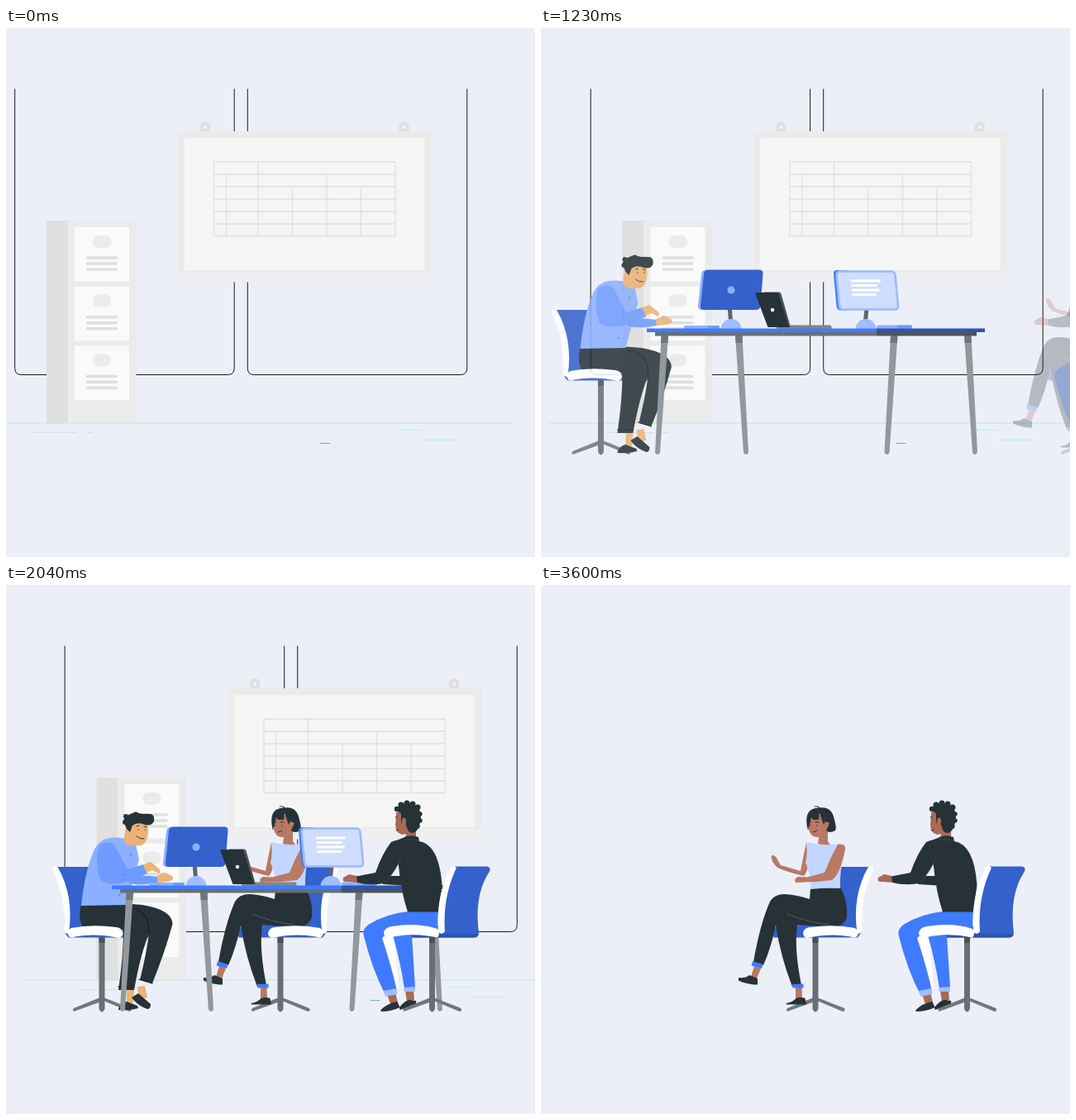
Write an HTML page that moves like this. It is 640x640 px and loops after 3630 ms.

```html
<!DOCTYPE html>
<html lang="en">
<head>
<meta charset="utf-8">
<title>Office team</title>
<style>
html, body { margin: 0; width: 100%; height: 100%; overflow: hidden; background: #edeff8; }
svg { display: block; width: 100vw; height: 100vh; }
.ink { fill: #263238; } .blue { fill: #407bff; } .chair { fill: #3461cc; }
.sky { fill: #8cb0ff; } .sleeve { fill: #6f9bff; } .white { fill: #fff; }
.tan { fill: #ebb376; } .rose { fill: #b97964; } .brown { fill: #a96a55; }
.line { fill: none; stroke-linecap: round; }
</style>
</head>
<body>
<svg viewBox="0 0 640 640">
<defs>
  <g id="stand">
    <path fill="#70787c" d="M-2 499L-34 512q-2 2 0 4L2 503L33 516q4 0 2-4L2 499z"/>
    <path fill="#687075" d="M-3.5 424h7v89q-3.5 7-7 0z"/>
    <path fill="#4a5256" d="M-3.5 425h7v8h-7z"/>
  </g>
  <path id="back" class="chair" d="M345 341H400Q380 380 388 420L383 426.500H282q-4-6 1-12L345 400z"/>
  <g id="seat">
    <path class="white" d="M396 341Q403 339 402 345Q386 376 388.500 418q-1 5-6 3.500Q376 376 396 341z"/>
    <path class="white" d="M317 421q1-6 8-7Q355 410 380 415q6 5 2 10.500-4 2-7 0Q350 421 322 427q-5-1-5-6z"/>
  </g>
  <g id="card">
    <path fill="#fafafa" d="M83 241h66v65.500H83z"/>
    <rect x="105" y="251" width="22" height="15" rx="7" fill="#ebebeb"/>
    <path class="line" stroke="#e0e0e0" stroke-width="3.600" d="M98.500 278H133.500M98.500 285H133.500M98.500 292H133.500"/>
  </g>
  <g id="hook">
    <path fill="#e0e0e0" d="M-6 125v-6a6 6 0 0 1 12 0v6z"/>
    <circle cy="120" r="2" fill="#f5f5f5"/>
  </g>
  <path id="window" class="line" stroke="#000" stroke-width=".9" d="M0 74V411.500q0 8 8 8H257.500q8 0 8-8V74"/>
  <g id="leg">
    <path fill="#92989c" d="M-4 372H4.500L-5.500 513.500q-3 5-6 0z"/>
    <path fill="#70777c" d="M-4 372H4.500L3.900 381H-4.500z"/>
  </g>
</defs>

<g id="room">
  <use href="#window" x="10.700"/><use href="#window" x="292.300"/>
  <path fill="#e0e0e0" d="M49 233h26v245H49z"/>
  <path fill="#ebebeb" d="M75 233h82.500v245H75z"/>
  <use href="#card"/><use href="#card" y="71.700"/><use href="#card" y="143.400"/>
  <use href="#hook" x="241"/><use href="#hook" x="481.500"/>
  <path fill="#efeff1" d="M208 295H515L523 307.500H198z"/>
  <path fill="#ebebeb" d="M208 125h307v170.500H208z"/>
  <path fill="#f5f5f5" d="M216 133h290.500v160H216z"/>
  <path fill="none" stroke="#e0e0e0" stroke-width="1.300" d="M251.500 162H471V251.500H251.500zM251.500 177H471M251.500 192H471M251.500 207H471M251.500 222H471M251.500 237H471M305 162V251.500M266.500 177V251.500M388 177V251.500M346.500 192V251.500M429.500 192V251.500"/>
  <path stroke="#c3f0ec" stroke-width="1.500" d="M-39.500 478H612M477 486.500h25.500M503 498.500h44"/>
  <path stroke="#dcdce8" d="M29 489.500h57M97 489.500h8"/>
  <path stroke="#efefee" d="M132 494h123"/>
  <path stroke="#6fa6d8" d="M380 502.500h12"/>
</g>

<g id="woman">
  <use href="#stand" x="332"/>
  <use href="#back"/>
  <path class="rose" d="M254 474L258 461 266 464 261 476zM308 486h7.500l.5 15h-8z"/>
  <path class="ink" d="M239 475q8 1 13-3l10 4v7.500q-13 0-23-5zM296.500 506q8-1 12-6 6-2 11 0l1.500 7.500H297z"/>
  <path class="rose" d="M321 311L323 330Q324 346 318 352Q300 348 286 342Q277 333 279 327Q284 326 287 334L290 339 314 346Q317 330 321 311zM337 298h10v12l3 4q-8 3-15-1z"/>
  <path class="rose" d="M323 281Q322 299 329 304Q336 307 343 302L351 292 346 277z"/>
  <path class="ink" d="M321.500 290Q319 270 336 269.500q-2-2-6-1 3-3 8 1Q352 268 355 284Q358 295 356 297Q349 301 345 297L349 288 344 286 342 290 337 276 336 284H329L327 281 323 297z"/>
  <path class="line" stroke="#263238" d="M325.500 291h.6M333.500 291h.6M324 287.500l3-.5M332 286.500l4 .5M329 299q3 0 5-2"/>
  <path fill="#c3d6ff" d="M321 311Q340 316 362 313L367 322Q361 348 362 367.500L326 368.500Q327 350 320 336Q323 325 321 311z"/>
  <path class="ink" d="M326 368Q345 366 363 367Q372 385 370 402Q366 414 350 414L310 411Q306 440 315 484L304 486Q290 450 284 412Q278 440 269 460L257 456Q265 410 277 383Q282 374 295 374Q310 375 325 380z"/>
  <path class="line" stroke="#667075" stroke-width=".7" d="M298 398Q322 408 348 411"/>
  <path class="blue" d="M256 455l12.500 4-1.500 5-12.500-3.500zM304 483l13.500-.5v5h-13z"/>
  <path class="rose" d="M359 314Q369 312 368 320Q362 350 352 357Q330 360 308 360Q305 356 311 353L322 353.500 343 348Q350 330 359 314z"/>
  <use href="#seat"/>
</g>

<g id="typist">
  <use href="#stand" x="116"/>
  <use href="#back" transform="matrix(-1 0 0 1 458.500 0)"/>
  <path class="tan" d="M146 490h9l-1 16h-8zM159 486l9-1 3 14-10 2z"/>
  <path class="ink" d="M136 513q3-8 10-9l13 5 1 3q-10 3-24 2zM152 499l8-5 15 13q0 6-4 6-12-4-19-14z"/>
  <path class="ink" d="M91 386Q125 383 165 387Q201 393 201.500 410Q192 445 177 482L162 478Q170 445 173 422Q163 445 155 490H136Q142 450 142 417L95 417Q86 405 91 386z"/>
  <path class="line" stroke="#141d22" stroke-width="1.200" d="M150 390Q175 394 173 422M161 477l16 5M136 486h19"/>
  <path class="sky" d="M121 307Q142 302 157 314L161 332Q152 365 146 387L91 388Q95 350 104 327Q109 311 121 307z"/>
  <path class="sleeve" d="M113 315Q129 305 135 322L147 344 166 338 171 349 147 359Q122 365 114 356Q106 335 113 315z"/>
  <path class="sleeve" d="M147 353Q165 350 184 353V360Q165 364 149 361z"/>
  <path class="tan" d="M166 338l9-3 10 8q3 4 0 6l-8-4-7 3zM183 352l9-4 9 4q3 4-2 6-8 2-16 2z"/>
  <path class="tan" d="M146 288Q143 302 142 311q7 7 14 4 12 2 15-9Q174 293 169 287z"/>
  <path class="sky" d="M141 307l-3 9q10 8 19 2l-2-3q-8 2-14-8z"/>
  <g class="ink">
    <path d="M146 295Q139 281 147 279Q154 273 165 277Q181 275 179 286Q176 292 168 290Q159 286 153 291L150 299z"/>
    <circle cx="145" cy="280" r="3"/><circle cx="144" cy="287" r="3"/><circle cx="174" cy="282" r="5"/><circle cx="157" cy="278" r="3.500"/>
  </g>
  <path class="line" stroke="#263238" d="M160 296h.6M168 296h.6M158 292l3-1M167 292l3 1M158 304q4 4 9 3"/>
  <path class="line" stroke="#4c7de8" stroke-width="2" d="M150.500 326h.1M143.500 350h.1M137.500 375h.1"/>
  <use href="#seat" transform="matrix(-1 0 0 1 458.500 0)"/>
</g>

<g id="desk">
  <use href="#leg" x="149.500"/><use href="#leg" x="427"/>
  <use href="#leg" transform="matrix(-1 0 0 1 239.500 0)"/><use href="#leg" transform="matrix(-1 0 0 1 516.500 0)"/>
  <path fill="#687077" d="M138 368h268v4.500H138z"/><path fill="#4d565b" d="M406 368h121v4.500H406z"/>
  <path class="line" stroke="#5d656a" stroke-width="5" stroke-linecap="butt" d="M228 336l1.500 18M394 340l-1.500 14"/>
  <path fill="#9fbdff" d="M217.500 364.500a12.500 12.500 0 0 1 25 0zM380.500 364.500a12.500 12.500 0 0 1 25 0z"/>
  <path class="sky" d="M199 293H262L258 341H195q-5.500 0-5-5L194 298q.5-5 5-5z"/>
  <path class="chair" d="M202 292.500H264q5 0 4.500 5L265.500 336q-.5 5-5.500 5H197q-4.500 0-4-5L197 297.500q.5-5 5-5z"/>
  <circle cx="230" cy="317" r="4.500" class="sky"/>
  <path class="blue" d="M358 293H372V341.500H363q-5 0-5.500-5L354 298q-.5-5 4-5z"/>
  <path fill="#cfddff" stroke="#9cbaff" stroke-width="2.600" d="M362 294.500H423q5 0 5.500 4.500L432 336q.5 4.500-4 4.500H366q-4.500 0-5-4.500L357.500 299q-.5-4.500 4.500-4.500z"/>
  <path class="line" stroke="#fff" stroke-width="3" d="M376 306h33.500M376.500 311.500h29M377 317h31.500M377.500 322.500h27"/>
  <rect x="173" y="360" width="43" height="5" rx="2" class="sky"/><rect x="202" y="360" width="14" height="4" rx="2" class="sleeve"/>
  <rect x="406" y="359.500" width="43" height="5" rx="2" class="sky"/><rect x="430" y="359.500" width="19" height="4" rx="2" class="sleeve"/>
  <rect x="285" y="359.500" width="66.500" height="5" rx="2" fill="#7f878c"/>
  <path fill="#4a5459" d="M270 319.500H288q2 0 2.500 2L302 362h-10z"/>
  <path class="ink" d="M261 320H285q2 0 2.500 2L300 362H274.500L259.500 322q-.5-2 1.500-2z"/>
  <circle cx="280" cy="341" r="2.200" class="white"/>
  <path class="blue" d="M128 363.500h278v4.500H128z"/><path fill="#3055b0" d="M406 363.500h131v4.500H406z"/>
</g>

<g id="visitor">
  <path class="chair" d="M541 340.500H582q5 1 3 6Q566 375 572 421q-1 5.500-6 5.500H480V412H524z"/>
  <path fill="#2a54b5" d="M480 422H572q-1 4.500-6 4.500H480z"/>
  <path class="brown" d="M461 495l10-2 3 12-9 2zM483 491h10l1 11-9 2z"/>
  <path class="ink" d="M453.500 514q8-8 20-10l3 7q-10 5-23 5zM476 511q6-8 12-9l8 1 .5 5q-10 3-20 6z"/>
  <use href="#stand" x="515.500"/>
  <path class="white" d="M455 428l15-2 5 63h-4z"/>
  <path class="blue" d="M486 395H523L522 418Q490 412 462 420L455 427Q466 460 473 491L459 496Q443 465 433 425Q430 416 440 410Q460 398 486 395zM468 424H491L495 487 482 488Q477 455 468 424z"/>
  <path fill="#a0bdff" d="M457 491l15-3 1.500 7-14 3zM481 487l14-1v6h-13z"/>
  <path class="brown" d="M472 275Q472 284 471 289q0 11 8 13l5-1-1 6 13-1V290L486 272z"/>
  <g class="ink">
    <path d="M474 274Q472 264 486 264Q501 264 502 281Q500 300 491 300Q486 299 485 293L481 283 478 289V276z"/>
    <circle cx="473" cy="271" r="3.200"/><circle cx="478" cy="266" r="3.500"/><circle cx="485" cy="264" r="3.500"/>
    <circle cx="492" cy="265" r="3.500"/><circle cx="498" cy="269" r="3.500"/><circle cx="501" cy="277" r="2.700"/><circle cx="501" cy="285" r="2.700"/><circle cx="498" cy="292" r="2.700"/>
  </g>
  <ellipse cx="481.500" cy="286" rx="2.500" ry="4.500" class="brown"/>
  <path class="line" stroke="#263238" d="M471 281l2-.5M472.500 284h.4M472 297l3-1"/>
  <path class="brown" d="M408 354l7-4 10 2v8l-12-1q-7 1-5-5z"/>
  <path class="ink" d="M456 352H480V363.500L456 362zM480 306q8-5 19-1l1 5Q524 314 527.500 363L523 395.500H486Q478 372 475 340L470 310z"/>
  <path class="ink" d="M466 311Q475 306 484 311Q478 340 457 361Q440 364 425 360L424 352.500 447 348Q455 325 466 311z"/>
  <path class="line" stroke="#414c51" stroke-width=".7" d="M481 309q8-3 18 1M478 329Q472 346 458 361"/>
  <path class="white" d="M538 342q3-4 7 0Q528 378 531 419q-4 6-8 0Q520 376 538 342zM457 420q2-6 10-7Q498 408 522 416q4 6 0 10.500Q490 420 463 427q-6-1-6-7z"/>
</g>
</svg>
<script>
const LOOP = 3630, CUT = 3600, SWAY = 3580;
const part = id => document.getElementById(id);
const room = part('room'), desk = part('desk');
const seated = [
  { node: part('typist'), start: 600, length: 1000, from: -320, gain: 1 },
  { node: part('woman'), start: 1100, length: 930, from: 450, gain: 1.06 },
  { node: part('visitor'), start: 1100, length: 930, from: 256, gain: 1 }
];
const clamp = v => Math.max(0, Math.min(1, v));
const easeOut = p => 1 - (1 - p) ** 2;

function draw(t) {
  const shown = t < CUT ? 1 : 0;
  const drift = 63.5 * (1 - Math.cos(2 * Math.PI * t / SWAY)) / 2;
  room.setAttribute('transform', `translate(${drift} 0)`);
  room.setAttribute('opacity', shown);
  desk.setAttribute('opacity', shown * easeOut(clamp(t / 560)));
  for (const { node, start, length, from, gain } of seated) {
    const e = easeOut(clamp((t - start) / length));
    node.setAttribute('transform', `translate(${from * (1 - e)} 0)`);
    node.setAttribute('opacity', clamp(e * gain));
  }
  if (!shown) seated[0].node.setAttribute('opacity', 0);
}

const begin = performance.now();
function tick() {
  draw((performance.now() - begin) % LOOP);
  requestAnimationFrame(tick);
}
tick();
</script>
</body>
</html>
```
